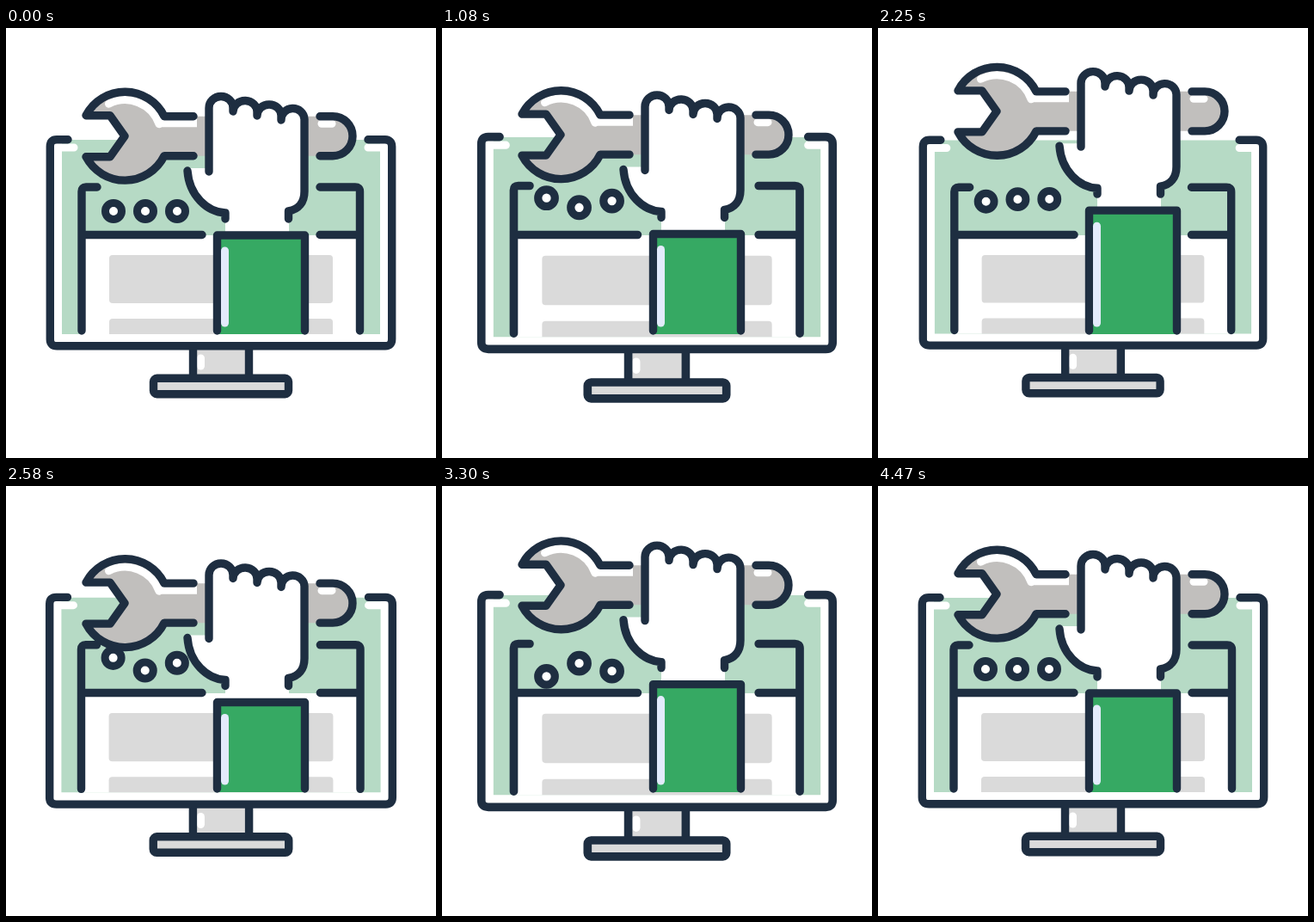
An HTML page for the animation above (4.5 s loop, 500 by 500 pixels).

```html
<!DOCTYPE html>
<html lang="en">
<head>
<meta charset="utf-8">
<title>Repair service</title>
<style>
  html, body { margin: 0; width: 100%; height: 100%; overflow: hidden; background: #fff; }
  svg { display: block; width: 100%; height: 100%; }
  .line { fill: none; stroke: #1e2e41; stroke-width: 9.4; stroke-linecap: round; stroke-linejoin: round; }
  .shine { fill: none; stroke: #fff; stroke-width: 9; stroke-linecap: round; }
  .white { fill: #fff; }
  .mint { fill: #b6dac5; }
  .pale { fill: #dadada; }
  .steel { fill: #c1bfbd; }
</style>
</head>
<body>
<svg viewBox="0 0 500 500">
  <g id="monitor">
    <path class="pale" d="M217 370H282V407H217Z"/>
    <path class="shine" d="M226.500 384V393"/>
    <path class="line" d="M217.500 372V405M282.500 372V405"/>
    <rect class="line" x="171.500" y="407.300" width="157" height="18.400" rx="4" style="fill:#dadada"/>
    <rect class="white" x="51" y="138" width="398" height="232" rx="8"/>
    <path class="mint" d="M65 130H435V356H65Z"/>
    <path class="shine" d="M64 139H79M436 139H421"/>
    <path class="white" d="M88 241H411V356H88Z"/>
    <rect class="pale" x="120" y="264" width="260" height="56" rx="4"/>
    <path class="pale" d="M120 356V342q0-4 4-4H376q4 0 4 4V356Z"/>
    <path class="line" d="M72 129.700H59q-7.700 0-7.700 8V362q0 7.700 8 7.700H441q7.700 0 7.700-8V138q0-8-8-8.300H421"/>
    <path class="line" d="M106 185H93q-5 0-5 5V352M365 185H406q5.500 0 5.500 5V352M88 240.500H228M365 240.500H411"/>
    <g id="dots" class="line" style="stroke-width:9">
      <circle class="white" cx="125" r="9.500"/>
      <circle class="white" cx="162" r="9.500"/>
      <circle class="white" cx="199" r="9.500"/>
    </g>
  </g>

  <g id="hand">
    <g transform="translate(0 .7)">
      <path class="steel" d="M93 101H121L138 125L121 149H93A51 51 0 0 0 184 148H380A23 23 0 0 0 380 102H184A51 51 0 0 0 93 101Z"/>
      <path class="shine" d="M119.500 87.500A42 42 0 0 1 178 111"/>
      <path class="white" d="M177 104H222V114.500H177Z"/>
      <path class="shine" d="M367 110.500H379"/>
      <path class="line" d="M218 102H184A51 51 0 0 0 93 101H121L138 125L121 149H93A51 51 0 0 0 184 148H218M365 102H380A23 23 0 0 1 380 148H365"/>
    </g>
    <path class="white" d="M211 163H236V93A14 14 0 0 1 264 97A14 14 0 0 1 292 101A14 14 0 0 1 320 106A13.500 13.500 0 0 1 347 106V190C347 203 340 211 329 213V241H255V215C234 214 213 195 211 163Z"/>
    <path class="line" d="M236 167V93A14 13.500 0 0 1 264 93V97A14 13 0 0 1 292 98V102A14 13 0 0 1 320 102V107A13.500 13 0 0 1 347 106V190C347 203 340 211 328.500 213V222M211 166C213 195 234 214 255 215V222"/>
  </g>

  <path id="cloth" fill="#36a963"/>
  <path id="sleeve" class="line"/>
  <path id="cuffShine" class="shine" style="stroke:#e3ebfc"/>
</svg>
<script>
  const LOOP = 4500, SWING = 714;
  const [monitor, hand, cloth, sleeve, cuffShine, dotGroup] =
    ["monitor", "hand", "cloth", "sleeve", "cuffShine", "dots"].map(id => document.getElementById(id));
  const dots = [...dotGroup.children];
  const dotStarts = [300, 30, 160];
  const zoomKeys = [[0, 1], [1080, 1.028], [2210, 0.995], [3330, 1.028], [4450, 1]];

  const steep = u => u * u / (u * u + (1 - u) * (1 - u));
  const gentle = u => (1 - Math.cos(Math.PI * u)) / 2;

  // Eased value at time t through [time, value] keys, held at both ends.
  function track(keys, t, ease) {
    if (t <= keys[0][0]) return keys[0][1];
    for (let i = 1; i < keys.length; i++) {
      const [t0, v0] = keys[i - 1], [t1, v1] = keys[i];
      if (t < t1) return v0 + (v1 - v0) * ease((t - t0) / (t1 - t0));
    }
    return keys[keys.length - 1][1];
  }

  // Rest, then up and down alternately, then back to rest.
  function swing(t, start, up, down) {
    const keys = [0, up, down, up, down, up, 0]
      .map((v, i) => [Math.min(start + i * SWING, 4470), v]);
    return track(keys, t, steep);
  }

  function draw(t) {
    const zoom = track(zoomKeys, t, gentle);
    monitor.setAttribute("transform", `translate(250 240) scale(${zoom}) translate(-250 -240)`);
    dots.forEach((dot, i) => dot.setAttribute("cy", 213 + swing(t, dotStarts[i], -14.4, 10.4)));

    const lift = swing(t, 22, -30, 31);
    hand.setAttribute("transform", `translate(0 ${lift})`);
    cloth.setAttribute("d", `M245.500 356V${241 + lift}H347.500V356Z`);
    sleeve.setAttribute("d", `M245.500 352V${241 + lift}H347.500V352`);
    cuffShine.setAttribute("d", `M254.500 ${259 + lift}V343`);
  }

  function frame(now) {
    draw(now % LOOP);
    requestAnimationFrame(frame);
  }
  frame(0);
</script>
</body>
</html>
```
